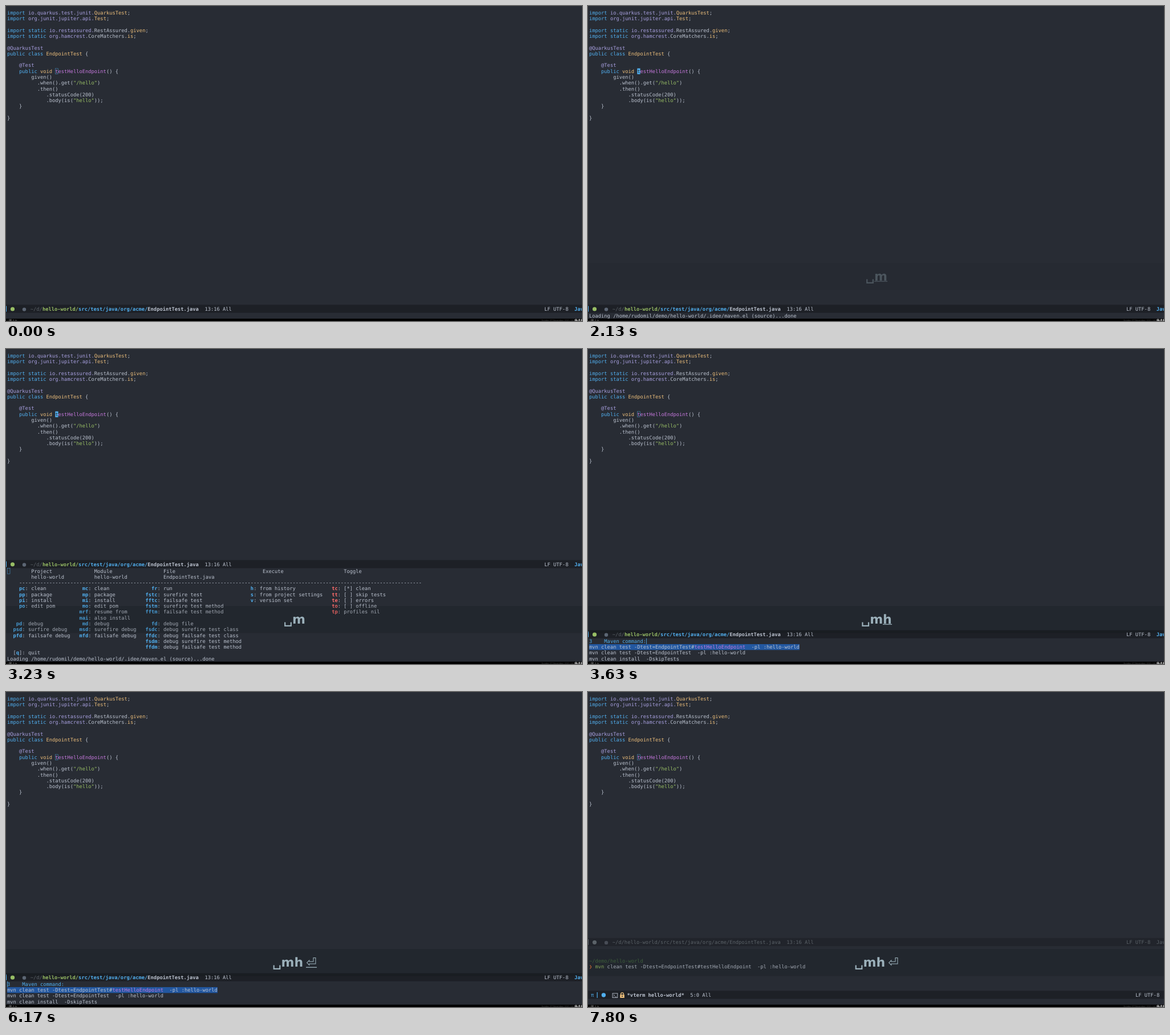
These frames come from a looping animation (1010x554 px, 8000 ms). An HTML page with a canvas:

```html
<!DOCTYPE html>
<html>
<head>
<meta charset="utf-8">
<style>
html, body { margin: 0; width: 100%; height: 100%; overflow: hidden; background: #282c34; }
canvas { display: block; }
</style>
</head>
<body>
<canvas id="stage" width="1010" height="554"></canvas>
<script>
const ctx = document.getElementById('stage').getContext('2d');
ctx.textRendering = 'geometricPrecision';

const CELL = 5.27, LINE = 10.277, ASCENT = 8.1, LEFT = 2;
const BAR_HEIGHT = 14.2, ECHO_TOP = 539.6;
const MONO = '8.753px "DejaVu Sans Mono", monospace';
const SANS = '22px "DejaVu Sans", sans-serif';
const BG = '#282c34', KEYS = '#9bb0ba';
const COLORS = {
  f: '#bbc2cf', b: '#51afef', v: '#a9a1e1', m: '#c678dd', y: '#ecbe7b', g: '#98be65',
  r: '#ff6c6b', o: '#e0733a', d: '#5b6268', t: '#456b43'
};

// In markup, ^x switches to colour x; an upper-case letter also means bold.
const CODE = [
  '^bimport ^vio.quarkus.test.junit.^yQuarkusTest^f;',
  '^bimport ^vorg.junit.jupiter.api.^yTest^f;',
  '',
  '^bimport static ^vio.restassured.^fRestAssured.^ygiven^f;',
  '^bimport static ^vorg.hamcrest.^fCoreMatchers.^yis^f;',
  '',
  '^v@QuarkusTest',
  '^bpublic class ^yEndpointTest ^f{',
  '',
  '^v    @Test',
  '^b    public ^yvoid ^mtestHelloEndpoint^f() {',
  '        given()',
  '          .when().get(^g"/hello"^f)',
  '          .then()',
  '             .statusCode(200)',
  '             .body(is(^g"hello"^f));',
  '    }',
  '',
  '}'
];

const MENU = [
  [6, 3, 'B', ['pc clean', 'pp package', 'pi install', 'po edit pom']],
  [5, 9, 'B', ['pd debug', 'psd surfire debug', 'pfd failsafe debug']],
  [27, 3, 'B', ['mc clean', 'mp package', 'mi install', 'mo edit pom', 'mrf resume from',
    'mai also install', 'md debug', 'msd surefire debug', 'mfd failsafe debug']],
  [50, 3, 'B', ['fr run', 'fstc surefire test', 'fftc failsafe test', 'fstm surefire test method',
    'fftm failsafe test method']],
  [50, 9, 'B', ['fd debug file', 'fsdc debug surefire test class', 'ffdc debug failsafe test class',
    'fsdm debug surefire test method', 'ffdm debug failsafe test method']],
  [82, 3, 'B', ['h from history', 's from project settings', 'v version set']],
  [110, 3, 'R', ['tc [*] clean', 'tt [ ] skip tests', 'te [ ] errors', 'to [ ] offline', 'tp profiles nil']]
];

function rect(color, x, y, w, h) {
  ctx.fillStyle = color;
  ctx.fillRect(x, y, w, h);
}

function dot(color, x, y, r) {
  ctx.fillStyle = color;
  ctx.beginPath();
  ctx.arc(x, y, r, 0, 7);
  ctx.fill();
}

function plain(str, x, y, font, color) {
  ctx.font = font;
  ctx.fillStyle = color;
  ctx.fillText(str, x, y);
}

function rich(markup, x, baseline) {
  ('^f' + markup).split('^').slice(1).forEach(run => {
    const key = run[0], str = run.slice(1), low = key.toLowerCase();
    plain(str, x, baseline, (key === low ? '' : 'bold ') + MONO, COLORS[low]);
    x += str.length * CELL;
  });
}

const put = (markup, col, top) => rich(markup, LEFT + col * CELL, top + ASCENT);
const barCursor = (x, top) => rect(COLORS.b, x, top, 0.8, LINE);

function hollow(x, top) {
  ctx.strokeStyle = COLORS.b;
  ctx.lineWidth = 0.45;
  ctx.strokeRect(x + 0.25, top + 0.25, CELL - 0.5, LINE - 0.5);
}

function code(solid) {
  const top = 6.9;
  CODE.forEach((line, i) => put(line, 0, top + i * LINE));
  const x = LEFT + 16 * CELL, y = top + 10 * LINE;
  if (!solid) return hollow(x, y);
  rect(COLORS.b, x, y, CELL, LINE);
  plain('t', x, y + ASCENT, MONO, BG);
}

function fileBar(bottom, active) {
  const base = bottom - 3.7;
  rect(active ? '#1d2026' : '#21242b', 0, bottom - BAR_HEIGHT, 1010, BAR_HEIGHT);
  rect(active ? COLORS.b : COLORS.d, 0, bottom - 12, 1, 10);
  dot(active ? COLORS.g : COLORS.d, 11.5, bottom - 6.6, 3.6);
  dot(active ? '#5c6674' : '#474c55', 32, bottom - 6, 3.2);
  rich(active
    ? '^d~/d/^Ghello-world/^Bsrc/test/java/org/acme/^FEndpointTest.java^f  13:16 All'
    : '^d~/d/hello-world/src/test/java/org/acme/EndpointTest.java  13:16 All', 42.8, base);
  rich(active ? 'LF UTF-8  ^BJava' : '^dLF UTF-8  Java', 944, base);
}

function terminalBar(position) {
  const base = ECHO_TOP - 3.7;
  rect('#1d2026', 0, ECHO_TOP - BAR_HEIGHT, 1010, BAR_HEIGHT);
  rich('^bπ', 5, base);
  rect(COLORS.b, 15.6, 528, 1.2, 10);
  dot(COLORS.b, 27.4, 533, 3.7);
  ctx.strokeStyle = COLORS.f;
  ctx.lineWidth = 0.9;
  ctx.strokeRect(43, 530, 8.8, 7.6);
  ctx.beginPath();
  ctx.moveTo(44.8, 532);
  ctx.lineTo(46.7, 533.8);
  ctx.lineTo(44.8, 535.6);
  ctx.moveTo(47.4, 536);
  ctx.lineTo(50, 536);
  ctx.stroke();
  ctx.strokeStyle = COLORS.y;
  ctx.lineWidth = 1.3;
  ctx.beginPath();
  ctx.arc(60, 531.3, 2.4, Math.PI, 0);
  ctx.lineTo(62.4, 533);
  ctx.moveTo(57.6, 531.3);
  ctx.lineTo(57.6, 533);
  ctx.stroke();
  rect(COLORS.y, 56.2, 532.3, 7.6, 5.7);
  dot('#1d2026', 60, 535.1, 1);
  rich(`^F*vterm hello-world*^f  ${position} All`, 68.6, base);
  rich('LF UTF-8', 960, base);
}

// Top of a row in a bottom area that is `count` rows high.
const rowTop = (count, row) => ECHO_TOP - (count - 1 - row) * LINE;

function message(done) {
  put('Loading /home/rudomil/demo/hello-world/.idee/maven.el (source)...' + (done ? 'done' : ''),
    0, rowTop(1, 0));
}

function menu() {
  const top = row => rowTop(16, row);
  fileBar(top(0), true);
  hollow(LEFT, top(0));
  [['Project', 8], ['Module', 29], ['File', 52], ['Execute', 85], ['Toggle', 112]]
    .forEach(([title, col]) => put(title, col, top(0)));
  [['hello-world', 8], ['hello-world', 29], ['EndpointTest.java', 52]]
    .forEach(([name, col]) => put(name, col, top(1)));
  put('-'.repeat(134), 4, top(2));
  for (const [colon, first, color, items] of MENU) {
    items.forEach((item, i) => {
      const cut = item.indexOf(' ');
      put(`^${color}${item.slice(0, cut)}^f:${item.slice(cut)}`, colon - cut, top(first + i));
    });
  }
  put('[^Bq^f]: quit', 2, top(14));
  message(true);
}

function history(t) {
  const top = row => rowTop(4, row);
  fileBar(top(0), true);
  put('^b3    Maven command:', 0, top(0));
  rect('#2257a0', LEFT, top(1), 70 * CELL, LINE);
  put('mvn clean test -Dtest=EndpointTest#^mtestHelloEndpoint^f  -pl :hello-world', 0, top(1));
  put('mvn clean test -Dtest=EndpointTest  -pl :hello-world', 0, top(2));
  put('mvn clean install  -DskipTests', 0, top(3));
  if (t >= 6170) barCursor(LEFT, top(0));
  else if (t < 4230 || (t >= 4670 && t < 5230) || t >= 5670) barCursor(LEFT + 19 * CELL, top(0));
}

function terminal(t) {
  const start = 446.9, top = row => start + row * LINE, ran = t >= 7400;
  fileBar(start, false);
  if (ran) {
    put('^t~/demo/hello-world', 0, top(2));
    put('^o❯ ^gmvn ^fclean test -Dtest=EndpointTest#testHelloEndpoint  -pl :hello-world', 0, top(3));
  }
  if (t < 6730) barCursor(LEFT, top(1));
  if (ran && t < 7800) barCursor(LEFT, top(4));
  terminalBar(ran ? '5:0' : '2:0');
}

function keyOverlay(t) {
  if (t < 2130) return;
  const base = 482.8;
  const left = t < 3630 ? 488 : t < 6170 ? 480.2 : 468.5;
  const underline = (x, w) => rect(KEYS, x, 483.6, w, 1.3);
  ctx.globalAlpha = t < 2300 ? 0.32 : t < 2470 ? 0.7 : 1;
  rect('rgba(0,8,8,.14)', 0, 452, 1010, 47.5);
  ctx.strokeStyle = KEYS;
  ctx.lineWidth = 2.2;
  ctx.beginPath();
  ctx.moveTo(left + 1.2, 480.5);
  ctx.lineTo(left + 1.2, 486.9);
  ctx.lineTo(left + 11.8, 486.9);
  ctx.lineTo(left + 11.8, 480.5);
  ctx.stroke();
  plain(t < 3630 ? 'm' : 'mh', left + 14, base, 'bold ' + SANS, KEYS);
  if (t < 2470) underline(502, 23);
  if (t >= 3630 && t < 3930) underline(517, 16);
  if (t >= 6170) plain('⏎', 526.3, base, SANS, KEYS);
  if (t >= 6170 && t < 6330) underline(526, 19);
  ctx.globalAlpha = 1;
}

function desktopBar() {
  const tiny = '4px "DejaVu Sans", sans-serif';
  rect('#000', 0, ECHO_TOP + LINE, 1010, 5);
  plain('1', 2, 554, tiny, '#444');
  rect('#333', 5, 550.5, 5, 3.5);
  plain('2  3 io', 6.5, 554, tiny, '#777');
  plain('Sunday 07 November 2021 10:41', 939, 554, '3.6px "DejaVu Sans", sans-serif', '#444');
  plain('949', 997, 556, 'bold 7.5px "DejaVu Sans", sans-serif', '#ccc');
}

// Times at which the editor cursor flips between hollow and solid.
const FLIPS = [230, 570, 1100, 2000, 2130, 2730, 3230, 3630];

function draw() {
  const t = performance.now() % 8000;
  rect(BG, 0, 0, 1010, 554);
  code(FLIPS.filter(flip => t >= flip).length % 2);
  if (t < 2300) {
    fileBar(rowTop(1, 0), true);
    if (t >= 2000) message(t >= 2130);
  } else if (t < 3630) menu();
  else if (t < 6330) history(t);
  else terminal(t);
  keyOverlay(t);
  desktopBar();
  requestAnimationFrame(draw);
}
draw();
</script>
</body>
</html>
```
